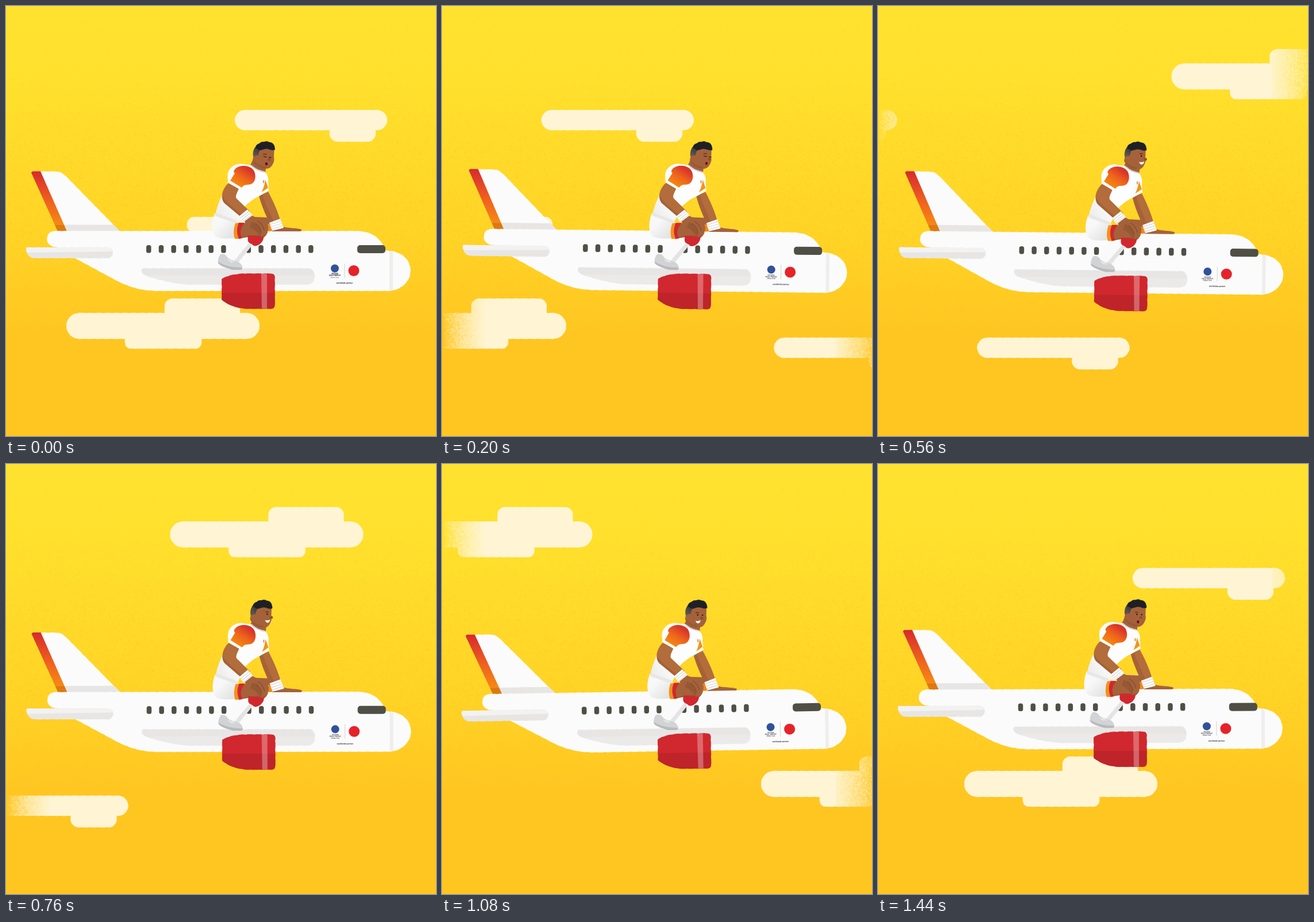
An HTML page with a canvas that plays this animation: 748 by 748 pixels, repeating every 1.48 s.

```html
<!DOCTYPE html>
<html lang="en">
<head>
<meta charset="utf-8">
<title>Plane ride</title>
<style>
  html, body { margin: 0; width: 100%; height: 100%; overflow: hidden; background: #ffd327; }
  canvas, svg { position: absolute; left: 0; top: 0; width: 748px; height: 748px; }
  .white { fill: #fbfbfb; stroke: #fbfbfb; }
  .grey { fill: #e7e6e5; stroke: #e7e6e5; }
  .rough { stroke-width: .7; stroke-dasharray: 9 6; stroke-linecap: round; }
  .dark { fill: #504f46; }
  .arm { fill: #b36c3c; }
  .skin { fill: #a5623a; }
  .shade { fill: #8c5230; }
  .red { fill: #d0282e; }
  .band { fill: #fff; }
  .line { fill: none; stroke: #d6d5d4; stroke-width: 1.2; }
  .ink { fill: none; stroke: #3a2016; stroke-width: 1.3; stroke-linecap: round; }
  text { font-family: Roboto, Arial, sans-serif; font-weight: 700; text-anchor: middle; fill: #34333a; }
</style>
</head>
<body>
<canvas id="sky" width="748" height="748"></canvas>
<svg viewBox="0 0 748 748">
  <defs>
    <linearGradient id="stripe" x1="0" y1="0" x2="0" y2="1">
      <stop offset="0" stop-color="#d62b2c"/><stop offset=".5" stop-color="#f0601f"/><stop offset="1" stop-color="#f79412"/>
    </linearGradient>
    <linearGradient id="sleeve" gradientUnits="userSpaceOnUse" x1="422" y1="280" x2="400" y2="314">
      <stop offset=".1" stop-color="#d8362a"/><stop offset=".5" stop-color="#ee641c"/><stop offset=".95" stop-color="#f58a10"/>
    </linearGradient>
    <linearGradient id="shirt" gradientUnits="userSpaceOnUse" x1="366" y1="362" x2="412" y2="334">
      <stop offset="0" stop-color="#ececeb"/><stop offset=".8" stop-color="#fdfdfd"/>
    </linearGradient>
    <linearGradient id="shorts" x1="0" y1="0" x2="1" y2="1">
      <stop offset=".35" stop-color="#f8f8f8"/><stop offset="1" stop-color="#dddcdc"/>
    </linearGradient>
    <linearGradient id="fade" x1="0" y1="1" x2=".6" y2="0">
      <stop offset="0" stop-color="#6c6059"/><stop offset="1" stop-color="#242529"/>
    </linearGradient>
  </defs>

  <g id="plane">
    <!-- tail fin -->
    <path class="white rough" d="M46 288H86C96 288 101 293 107 299L199 393H92Z"/>
    <path class="grey" d="M101 381H187L198 392H103Z"/>
    <path fill="url(#stripe)" d="M44 290Q45 287 48 287.500H60L106 392H90Z"/>
    <path fill="#b85a10" opacity=".4" d="M85 381H101L106 392H90Z"/>

    <!-- fuselage -->
    <path class="white rough" d="M85 391.500H608C636 391.500 652 403 660 425.500C690 426 703.500 442 703.500 461C703.500 478 688 495.500 664 495.500H266C236 495.500 216 489 196 479.500L121 439L88 419C76 419 71.500 412 71.500 405C71.500 397 77 391.500 85 391.500Z"/>
    <path fill="#efeeed" d="M667 427L673 428V494L667 495Z"/>
    <path class="grey rough" d="M36 420H176Q185.500 420 185.500 429Q185.500 438.500 176 438.500H50C41 438.500 34 431 35 421Z"/>
    <path fill="#f3f2f1" d="M36 420H178Q185 421 185 427L38 429Q34 425 36 420Z"/>
    <path class="grey rough" d="M238 456.500H526Q536.500 457 536.500 470Q536.500 484 524 484.500H318C290 483 262 475 243 469C235 466 234 457 238 456.500Z"/>
    <path fill="#efeeed" d="M243 469H536.500Q536 484 524 485H318C290 483 262 475 243 469Z" opacity=".55"/>
    <g id="windows" class="dark"></g>
    <rect class="dark" x="611" y="416" width="49" height="14" rx="5"/>

    <!-- livery -->
    <circle cx="572" cy="456.500" r="7" fill="#31519b"/>
    <text x="572" y="467" font-size="2.600">ORCHARD</text>
    <text x="572" y="470" font-size="3">FIELD TROPHY</text>
    <text x="572" y="472.800" font-size="2.300">SPRING TOUR</text>
    <path d="M589 448V473" stroke="#c9c8c6" stroke-width=".8"/>
    <circle cx="605" cy="460.500" r="9.500" fill="#e62329"/>
    <text x="589" y="483" font-size="3.500">worldwide partner</text>

    <!-- engine -->
    <path class="red rough" stroke="#d0282e" d="M375.500 475C386 468 402 465.500 420 465.500H461Q467.500 465.500 467.500 472V520Q467.500 526.500 461 526.500H420C402 526 386 520 375.500 511Z"/>
    <path fill="#be242a" d="M375.500 499H467.500V520Q467.500 526.500 461 526.500H420C402 526 386 520 375.500 511Z"/>
    <path fill="#fff" opacity=".3" d="M444 465.500H454V526.500H445Z"/>

    <!-- far arm and far leg -->
    <path class="skin" d="M418 372L434 367L460 368L464 391L430 392Z"/>
    <path fill="#f08a17" d="M455 379L462 380L464 391L456 392Z"/>
    <g class="upper">
      <path class="arm" d="M440 330L456 323C464 338 472 355 477 372L459 379C452 363 445 349 440 330Z"/>
      <path class="shade" opacity=".35" d="M440 330L446 328C452 346 460 360 466 376L459 379C452 363 445 349 440 330Z"/>
      <path class="skin" d="M462 389L482 384C493 387 508 386 514 389Q515 392 511 392H463Z"/>
      <path class="band" d="M458 377L477 370L483 386L463 391Z"/>
      <path class="line" d="M459.500 380L478.500 374M461 384L480 378M462.500 388L481.500 382"/>
    </g>

    <!-- near leg -->
    <path class="skin" d="M402 380L436 374C449 377 456 386 455 394Q452 402 444 405L425 404L402 404Z"/>
    <path class="shade" opacity=".5" d="M404 403C420 401 438 395 451 399L442 405H404Z"/>
    <path class="red" d="M421 399L448 401C449 409 441 417 433 417.500Q426 416 419 408Z"/>
    <path fill="#fafafa" d="M421 402C419 411 424 414 429 415L404 446L381 437C386 424 396 412 408 404Z"/>
    <path fill="#e4e4e4" d="M429 415L404 446L397 443L423 412Z"/>
    <path fill="#d2d3d5" d="M373 432Q378 430 383 434C387 442 396 442 404 445C411 449 413 456 409 458.500H394C384 455 372 451 369 447C368 442 370 436 373 432Z"/>
    <path fill="#b9babd" d="M369 445C380 451 390 455 411 455Q411 459 408 459H394C384 456 371 452 369 447Z"/>
    <path d="M386 441L393 446M391 442L397 446" stroke="#ecedee" stroke-width="1.500"/>

    <!-- shorts -->
    <path fill="url(#shorts)" d="M363 361C357 378 357 395 367 402C377 406 388 404 399 404L405 376Z"/>
    <path fill="#f2921a" d="M399 378L405 377C402 387 402 397 406 405L398 405C395 396 396 386 399 378Z"/>
    <path class="red" d="M405 377L415 377C407 387 406 396 411 404L405 405C401 395 401 386 405 377Z"/>

    <g class="upper">
      <path class="skin" d="M431 264L453 275L451 291L434 287L424 279Z"/>
      <path fill="url(#shirt)" d="M427 277L436 284L450 288C456 294 457 301 456 306L457 316C450 324 446 328 440 331C433 334 424 340 416 348L402 376L364 363C368 345 374 332 385 312C388 307 385 303 385.500 295C386 283 396 275 408 274.500Z"/>
      <path fill="#e6e5e4" d="M365 360L402 373L400 378L363 365Z" opacity=".8"/>
      <path fill="#f2931b" d="M451 302L456 316L444 325C448 318 450 310 451 302Z"/>
      <path d="M440 328.500L457 319" stroke="#fff" stroke-width="4"/>
      <path d="M427 278Q437 287 451 289" fill="none" stroke="#d5d4d2" stroke-width="2"/>
      <path d="M448 303v5" stroke="#db6a36" stroke-width="1.500"/>

      <g id="head">
        <path class="skin" d="M433 250C444 244 459 244 466.500 251L466 263C467.500 270 465 273 463 277C460 282 455 284 449 283C439 281 432 276 429 268Z"/>
        <path class="shade" opacity=".5" d="M429 267C436 275 443 278 453 280Q450 284 445 282C438 280 431 275 429 267Z"/>
        <path fill="url(#fade)" d="M430 262C428 252 433 243 441 240L449 247L441 252L438 261Z"/>
        <path fill="#1f2025" d="M434 247C434 241 440 239 441 239C444 235 448 237 450 236C454 234 457 237 459 237C464 237 468 242 468 250C461 253 457 247 450 249L442 251Z"/>
        <ellipse class="skin" cx="436" cy="264" rx="2.600" ry="4.300"/>
        <g id="face">
          <ellipse class="shade" cx="458" cy="267" rx="2.800" ry="2.400"/>
          <g id="open" fill="#24150f"><circle cx="451" cy="261.500" r="1.300"/><circle class="far" cx="459.500" cy="262" r="1.200"/></g>
          <g id="shut" class="ink"><path d="M448.500 261.500q2 1.500 4.500 .8"/><path class="far" d="M457.500 263q2 .8 3.500 .3"/></g>
          <path class="ink" opacity=".7" d="M448 257.500l5 .3"/>
          <ellipse id="oh" cx="453" cy="274.500" rx="2.500" ry="3.100" fill="#4b1417" stroke="#bd5148" stroke-width="1"/>
          <path id="smile" fill="#fff" d="M447 271.500Q452 273 456 270.500Q455 276.500 451 276Q448 275 447 271.500Z"/>
        </g>
      </g>

      <!-- near arm -->
      <path class="arm" d="M387 308L405 318C402 325 398 331 401 335L424 357L411 369L380 343C372 334 376 318 387 308Z"/>
      <path class="shade" opacity=".4" d="M377 331C383 343 400 354 414 366L411 369L380 343Q376 338 377 331Z"/>
      <path fill="url(#sleeve)" d="M399 283C408 275 425 277 431 286C436 295 434 307 426 310C419 312 415 309 410 316L390 304L398 291Q394 288 399 283Z"/>
      <path d="M388 305L407 317" stroke="#fff" stroke-width="4" stroke-linecap="round"/>
      <path class="skin" d="M415 374L427 364C437 370 450 371 456 382C458 390 452 398 444 402C438 398 433 390 418 384Z"/>
      <path class="shade" opacity=".6" d="M428 375C436 380 443 385 444 398L443 402C438 396 434 389 424 385Z"/>
      <path class="ink" opacity=".3" d="M438 374Q447 380 449 390M434 378Q442 384 444 394"/>
      <path class="band" d="M405 366L420 354L429 364L413 376Z"/>
      <path class="line" d="M407.500 369L422.500 357M410 372L425 360M412 375L427.500 363"/>
    </g>
  </g>
</svg>
<script>
const SIZE = 748, LOOP = 1480, STEP = 40, SPEED = 1.125, LAP = LOOP * SPEED;
const $ = id => document.getElementById(id);
const clamp = v => Math.max(0, Math.min(1, v));
const ease = (a, b, t) => { const p = clamp((t - a) / (b - a)); return p * p * (3 - 2 * p); };

let seed = 7;
const rnd = () => (seed = (seed * 16807) % 2147483647) / 2147483647;

function layer() {
  const c = document.createElement('canvas');
  c.width = c.height = SIZE;
  return [c, c.getContext('2d')];
}

function makeSky() {
  const [c, g] = layer();
  const grad = g.createLinearGradient(0, 0, 0, SIZE);
  [[0, '#ffe12f'], [.17, '#ffe02d'], [.5, '#ffd527'], [.76, '#ffc621'], [1, '#ffc521']]
    .forEach(([at, col]) => grad.addColorStop(at, col));
  g.fillStyle = grad;
  g.fillRect(0, 0, SIZE, SIZE);
  for (let i = 0; i < 22000; i++) {
    g.fillStyle = rnd() < .5 ? 'rgba(255,232,70,.2)' : 'rgba(246,176,16,.16)';
    g.fillRect(rnd() * SIZE, 110 + (rnd() + rnd()) * 225, 1.4, 1.4);
  }
  return c;
}

// Grainy mask that dissolves clouds at both sides
function makeMask() {
  const [c, g] = layer();
  g.fillRect(75, 0, 610, SIZE);
  const column = (x, a) => {
    g.globalAlpha = a;
    g.fillRect(x, 0, 1, SIZE);
    for (let y = 0; y < SIZE; y += 2) {
      if (rnd() > a) continue;
      g.globalAlpha = .3;
      g.fillRect(x, y + rnd(), 2, 2);
    }
  };
  for (let x = 2; x < 75; x++) column(x, .95 * Math.pow(x / 75, .9));
  for (let x = 685; x < SIZE; x++) column(x, .85 - .7 * (x - 685) / 63);
  return c;
}

// Bars as [x, y, width, height, radius] from the cloud's corner
const SMALL = [[0, 0, 265, 35, 17.5], [165, 24, 80, 31, 14]];
const LARGE = [[0, 25, 336, 45, 22.5], [171, 0, 131, 40, 13], [102, 55, 133, 32, 10]];
const PUFF = [[0, 0, 102, 27, 12]];
const clouds = [
  [SMALL, 398, 181], [SMALL, 802.5, 577], [LARGE, 1140.5, 75], [LARGE, 105, 509], [PUFF, 315, 367]
].map(([bars, x, y]) => {
  const path = new Path2D();
  bars.forEach(([bx, by, w, h, r]) => path.roundRect(bx, by, w, h, r));
  return { path, x, y };
});

const sky = makeSky(), mask = makeMask();
const [veil, v] = layer();
const ctx = $('sky').getContext('2d');

function drawClouds(t) {
  v.globalCompositeOperation = 'source-over';
  v.clearRect(0, 0, SIZE, SIZE);
  v.fillStyle = v.strokeStyle = '#fff5d5';
  v.lineWidth = .6;
  v.lineCap = 'round';
  v.setLineDash([9, 6]);
  for (const { path, x, y } of clouds) {
    let px = x - SPEED * t;
    if (px < -400) px += LAP;
    v.save();
    v.translate(px, y);
    v.fill(path);
    v.stroke(path);
    v.restore();
  }
  v.globalCompositeOperation = 'destination-in';
  v.drawImage(mask, 0, 0);
  ctx.drawImage(sky, 0, 0);
  ctx.drawImage(veil, 0, 0);
}

for (let i = 0; i < 14; i++) {
  $('windows').insertAdjacentHTML('beforeend',
    `<rect x="${244 + 21.7 * i}" y="416" width="8.5" height="13.5" rx="3.6"/>`);
}

const uppers = document.querySelectorAll('.upper'), fars = document.querySelectorAll('.far');
const show = (el, on) => el.setAttribute('visibility', on ? 'inherit' : 'hidden');

function pose(t) {
  const a = 2 * Math.PI * t / LOOP, k = (1 - Math.cos(a)) / 2;
  $('plane').setAttribute('transform',
    `translate(${.8 * k} ${5 * k}) rotate(${.9 * Math.sin(a)} 465 510)`);
  const s = 1 + .026 * k;
  uppers.forEach(u => u.setAttribute('transform',
    `translate(420 392) scale(1 ${s}) translate(-420 -392)`));
  $('head').setAttribute('transform', `translate(${-5 * k} ${-.3 * k})`);

  const turn = ease(60, 300, t) * (1 - ease(800, 1070, t));
  $('face').setAttribute('transform', `translate(${8 * turn} ${-1.5 * turn})`);
  const blink = t < 280, smile = t >= 280 && t < 1240;
  show($('shut'), blink);
  show($('open'), !blink);
  show($('smile'), smile);
  show($('oh'), !smile);
  fars.forEach(f => f.setAttribute('opacity', turn < .7 ? 1 : 0));
}

const start = performance.now();
let last = -1;
function frame() {
  const t = Math.floor(((performance.now() - start) % LOOP) / STEP) * STEP;
  if (t !== last) {
    drawClouds(t);
    pose(t);
    last = t;
  }
  requestAnimationFrame(frame);
}
frame();
</script>
</body>
</html>
```
